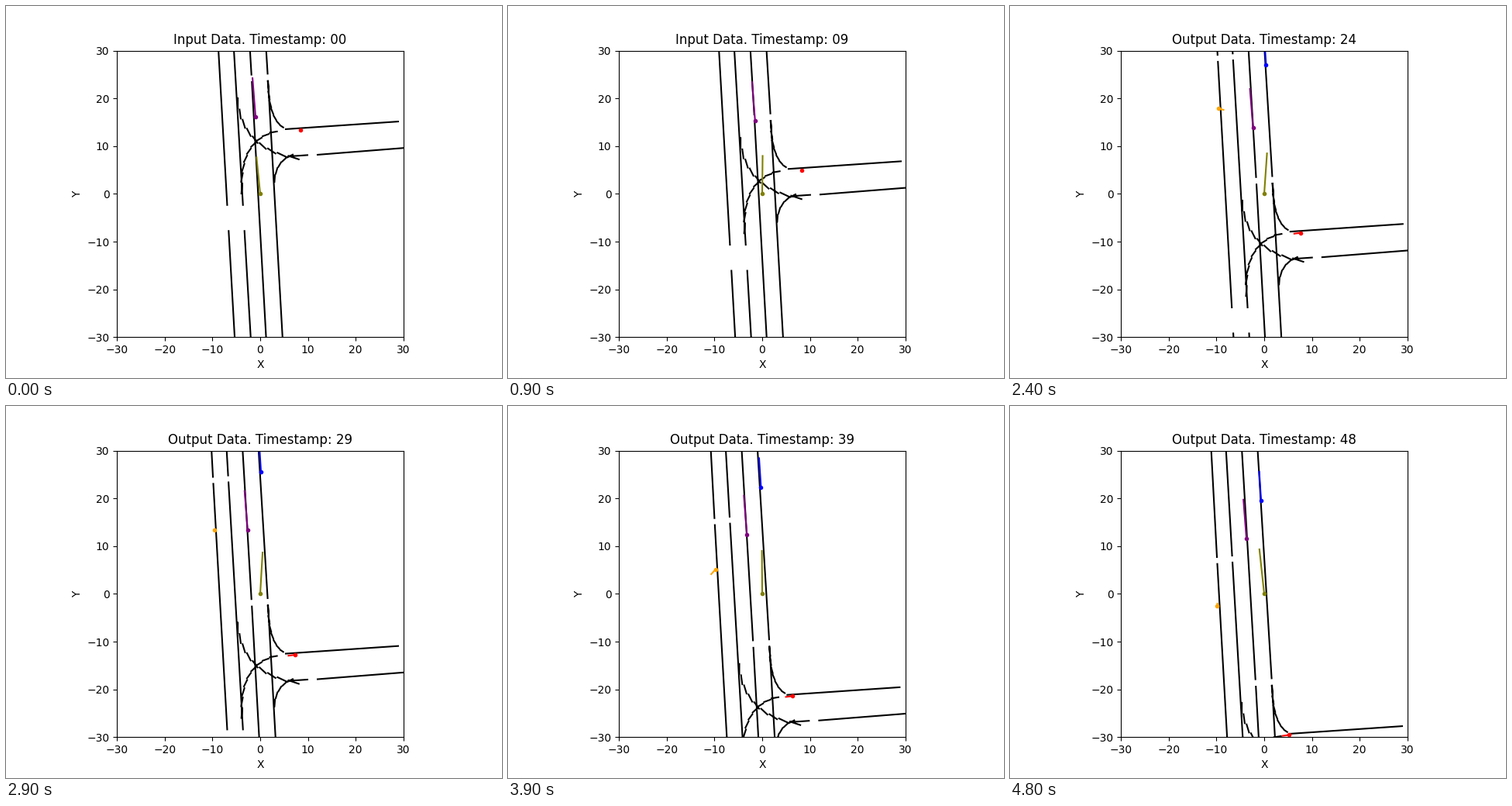
A matplotlib script that plays this animation: 640 by 480 pixels, repeating every 4900 ms.

```python
import matplotlib.pyplot as plt
import numpy as np
from matplotlib.animation import FuncAnimation

FRAMES = 49
INPUT_FRAMES = 19
GAP = np.full((1, 2), np.nan)

# Road movement seen from the car, in metres
TIMES = [0, 9, 16, 24, 33, 39, 48]
SHIFT_X = [0, 0.16, 0.32, 0.13, -0.1, -0.1, 0]
SHIFT_Y = [0, -8.33, -14.85, -21.46, -29.76, -34.71, -42.86]


def lane(x, y, up, down, blocked):
    """Lane through (x, y) with a short gap there and a slope either side."""
    def stretch(y0, y1, slope):
        ys = np.array([y0, y1])
        return np.column_stack([x - slope * (ys - y), ys])

    parts = [stretch(90, y + 0.6, up)]
    if blocked:
        return parts + [stretch(y - 0.5, -2.5, down), stretch(-7.6, -35, down)]
    return parts + [stretch(y - 0.6, -35, down)]


def turn(start, bend, end, dashes, kink):
    """Quadratic curve drawn as straight dashes, each turned by kink radians."""
    s = np.linspace(0, 1, dashes + 1)[:, None]
    curve = ((1 - s) ** 2 * np.array(start) + 2 * s * (1 - s) * np.array(bend)
             + s ** 2 * np.array(end))
    c, k = np.cos(kink), np.sin(kink)
    parts = []
    for a, b in zip(curve, curve[1:]):
        half = (b - a) / 2 @ np.array([[c, k], [-k, c]])
        mid = (a + b) / 2
        parts.append(np.array([mid - half, mid + half]))
    return parts


def build_roads():
    parts = [
        *lane(-9.86, 49.8, 0.0535, 0.0565, True),
        *lane(-6.68, 50.1, 0.0576, 0.0585, True),
        *lane(-1.79, 24.2, 0.0592, 0.0557, False),
        *lane(1.60, 24.4, 0.0612, 0.0565, False),
        np.array([[5.19, 13.54], [29.06, 15.16]]),
        np.array([[11.85, 8.18], [31.2, 9.7]]),
        np.array([[6.0, 7.85], [10.06, 8.13]]),
        *turn((1.62, 23.8), (1.75, 15.6), (4.95, 13.8), 7, 0.06),
        *turn((2.92, 2.34), (3.17, 7.05), (6.98, 8.26), 5, 0.06),
        *turn((-4.87, 20.2), (-3.9, 8.83), (8.28, 7.37), 9, -0.15),
        *turn((3.65, 13.2), (-4.7, 11.4), (-3.81, -0.1), 9, -0.12),
    ]
    return np.vstack([p for part in parts for p in (part, GAP)])


def road_shift(t):
    return np.array([np.interp(t, TIMES, SHIFT_X), np.interp(t, TIMES, SHIFT_Y)])


def agents(t):
    """Position and velocity of every road user at step t."""
    u = t / (FRAMES - 1)
    drop = road_shift(t)[1]
    pull_out = np.clip((t - 16) / 6, 0, 1)
    return {
        "red": ((8.44 - 3.25 * u ** 2, 13.3 + drop), (-1.5 * pull_out, -0.2 * pull_out)),
        "blue": ((1.42 - 2.07 * u, 34.6 - 15.05 * u), (-0.4, 6.2)),
        "orange": ((-9.3 - 0.58 * u, 39.0 + 1.3 * u ** 2 + drop), jitter[t]),
        "purple": ((-0.97 - 2.75 * u, 16.1 - 4.5 * u), (-0.65, 8.3)),
        "olive": ((0, 0), (0.6 - 6 * (u - 0.48) ** 2, 7.8 + 1.7 * u)),
    }


jitter = np.random.default_rng(4).normal(0, 0.6, (FRAMES, 2))
roads = build_roads()

fig, ax = plt.subplots(figsize=(6.4, 4.8), dpi=100)
ax.set(xlim=(-30, 30), ylim=(-30, 30), xlabel="X", ylabel="Y")
ax.set_aspect("equal", adjustable="box")
title = ax.set_title("")

road_line, = ax.plot([], [], color="black", solid_capstyle="butt")
arms, dots = {}, {}
for color in agents(0):
    arms[color], = ax.plot([], [], color=color, solid_capstyle="butt")
    dots[color], = ax.plot([], [], ".", color=color)


def draw(t):
    stage = "Input" if t < INPUT_FRAMES else "Output"
    title.set_text(f"{stage} Data. Timestamp: {t:02d}")
    road_line.set_data(*(roads + road_shift(t)).T)
    for color, (pos, vel) in agents(t).items():
        (x, y), (dx, dy) = pos, vel
        arms[color].set_data([x, x + dx], [y, y + dy])
        dots[color].set_data([x], [y])
    return [title, road_line, *arms.values(), *dots.values()]


anim = FuncAnimation(fig, draw, frames=FRAMES, interval=100, repeat=True,
                     repeat_delay=0, blit=False)
plt.show()
```
